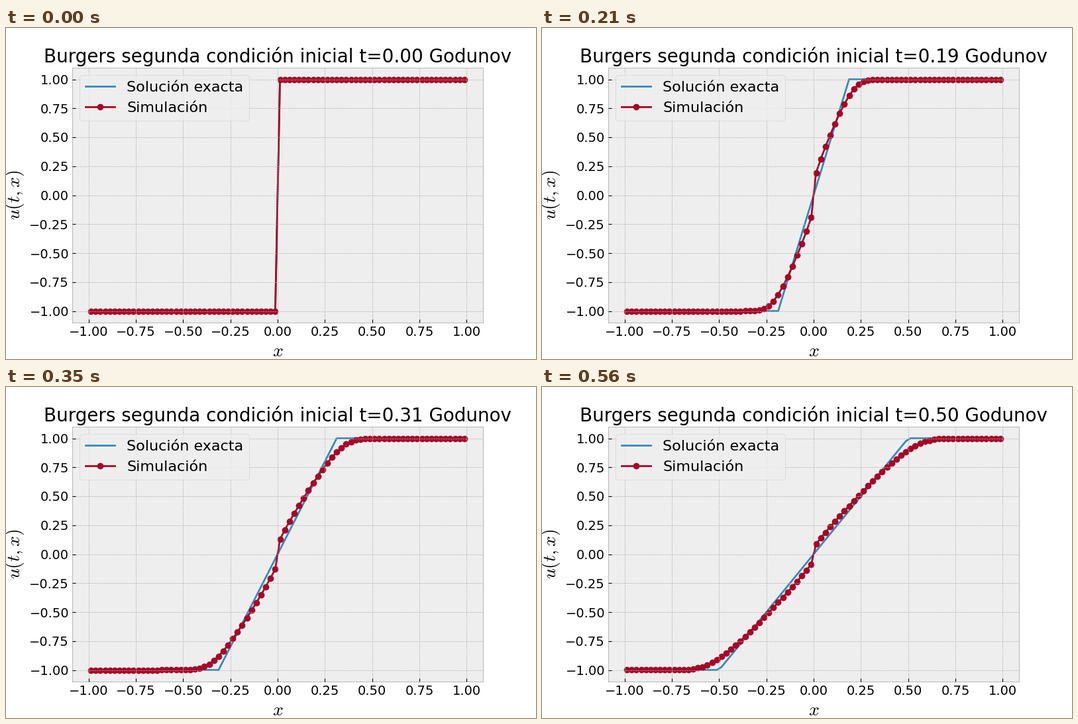
Recreate the animation shown at these times as a matplotlib script. Size 800x500 px, loop 630 ms.

```python
import numpy as np
import matplotlib.pyplot as plt
from matplotlib.animation import FuncAnimation

plt.style.use("bmh")
plt.rcParams.update({
    "font.family": "DejaVu Sans",
    "axes.axisbelow": False,
    "figure.facecolor": "white",
    "xtick.labelsize": 14,
    "ytick.labelsize": 14,
})

CELLS = 80
DX = 2 / CELLS
CFL = 0.5
FRAMES = 9
STEPS_PER_FRAME = 5
x = -1 + DX * (np.arange(CELLS) + 0.5)


def godunov_flux(left, right):
    """Godunov flux of u^2 / 2 at every cell interface."""
    return np.maximum(np.maximum(left, 0) ** 2, np.minimum(right, 0) ** 2) / 2


def advance(u):
    padded = np.concatenate(([u[0]], u, [u[-1]]))
    flux = godunov_flux(padded[:-1], padded[1:])
    return u - CFL * np.diff(flux)


def simulate():
    u = np.sign(x)
    states = [u]
    for _ in range(FRAMES - 1):
        for _ in range(STEPS_PER_FRAME):
            u = advance(u)
        states.append(u)
    return states


def exact(t):
    return np.clip(x / t, -1, 1) if t > 0 else np.sign(x)


states = simulate()

fig, ax = plt.subplots(figsize=(8, 5), dpi=100)
exact_line, = ax.plot(x, exact(0), label="Solución exacta")
sim_line, = ax.plot(x, states[0], "o-", label="Simulación")
ax.set_xlabel("$x$", fontsize=20)
ax.set_ylabel("$u(t,x)$", fontsize=20)
title = ax.set_title("", fontsize=20)
ax.legend(loc="upper left", fontsize=16)


def update(frame):
    t = frame * STEPS_PER_FRAME * CFL * DX
    exact_line.set_ydata(exact(t))
    sim_line.set_ydata(states[frame])
    title.set_text(f"Burgers segunda condición inicial t={t:.2f} Godunov")
    return exact_line, sim_line, title


anim = FuncAnimation(fig, update, frames=FRAMES, interval=70,
                     repeat=True, repeat_delay=0, blit=False)
plt.show()
```
